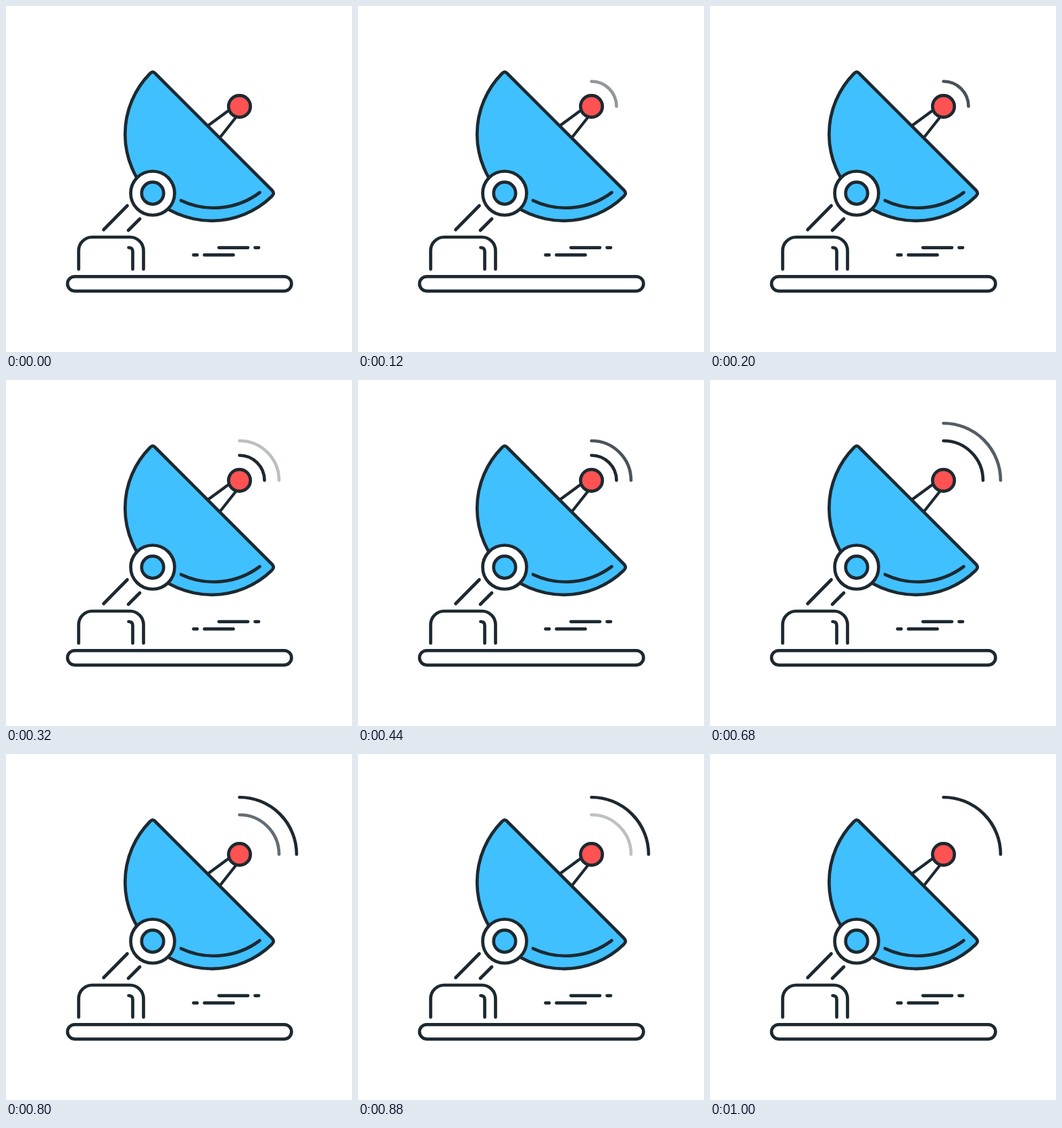
Write an HTML page that moves like this. It is 512x512 px and loops after 1.04 s.

```html
<!DOCTYPE html>
<html lang="en">
<head>
<meta charset="utf-8">
<title>Satellite dish</title>
<style>
  html, body { margin: 0; width: 100%; height: 100%; overflow: hidden; background: #fff; }
  svg { display: block; width: 100%; height: 100%; }
  .ink { fill: none; stroke: #1d2931; stroke-width: 4.7; stroke-linecap: round; stroke-linejoin: round; }
  .blue { fill: #40c0ff; }
  .red { fill: #ff5252; }
  .white { fill: #fff; }
  .wave { opacity: 0; animation: 1040ms linear infinite; }
  .near { animation-name: near; }
  .mid { animation-name: mid; }
  .far { animation-name: far; }
  /* 1040 ms loop: each wave fades in as the one before it settles */
  @keyframes near {
    0% { opacity: 0; }
    24.04%, 45.4% { opacity: 1; }
    65.4%, 100% { opacity: 0; }
  }
  @keyframes mid {
    0%, 24.04% { opacity: 0; }
    47.1%, 70.7% { opacity: 1; }
    90.4%, 100% { opacity: 0; }
  }
  @keyframes far {
    0%, 48.08% { opacity: 0; }
    71.2%, 100% { opacity: 1; }
  }
</style>
</head>
<body>
<svg viewBox="0 0 512 512">
  <g class="ink">
    <!-- ground, base and arm -->
    <rect x="91" y="400.3" width="331.5" height="21.5" rx="10.75"/>
    <path d="M107.5 389.5V362a20 20 0 0 1 20-20h56a20 20 0 0 1 20 20v27.5"/>
    <path d="M181.5 357.5q6 0 6 6v26"/>
    <path d="M179.5 295.5L144.5 331M198 315L181 332"/>
    <path d="M315 357.6H358M368.5 357.6H374M277.5 368.4H283M293.5 368.4H336.5"/>

    <!-- antenna -->
    <path stroke-width="4.2" d="M299 177L331 153.5M317.5 193.5L340 165"/>
    <circle class="red" cx="345.5" cy="148.5" r="16.2"/>

    <!-- dish -->
    <path class="blue" d="M220.5 99.5Q217 95.5 213 100A128 128 0 0 0 393 282Q398 277.5 394 273Z"/>
    <path d="M259 287.8A113 113 0 0 0 375.5 276"/>

    <!-- pivot -->
    <circle class="white" cx="217" cy="277" r="32.5"/>
    <circle class="blue" cx="217" cy="277" r="16.3"/>

    <!-- signal -->
    <path class="wave near" d="M345.5 111.5a37 37 0 0 1 37 37"/>
    <path class="wave mid" d="M345.5 90a58.5 58.5 0 0 1 58.5 58.5"/>
    <path class="wave far" d="M345.5 64a84.5 84.5 0 0 1 84.5 84.5"/>
  </g>
</svg>
</body>
</html>
```
